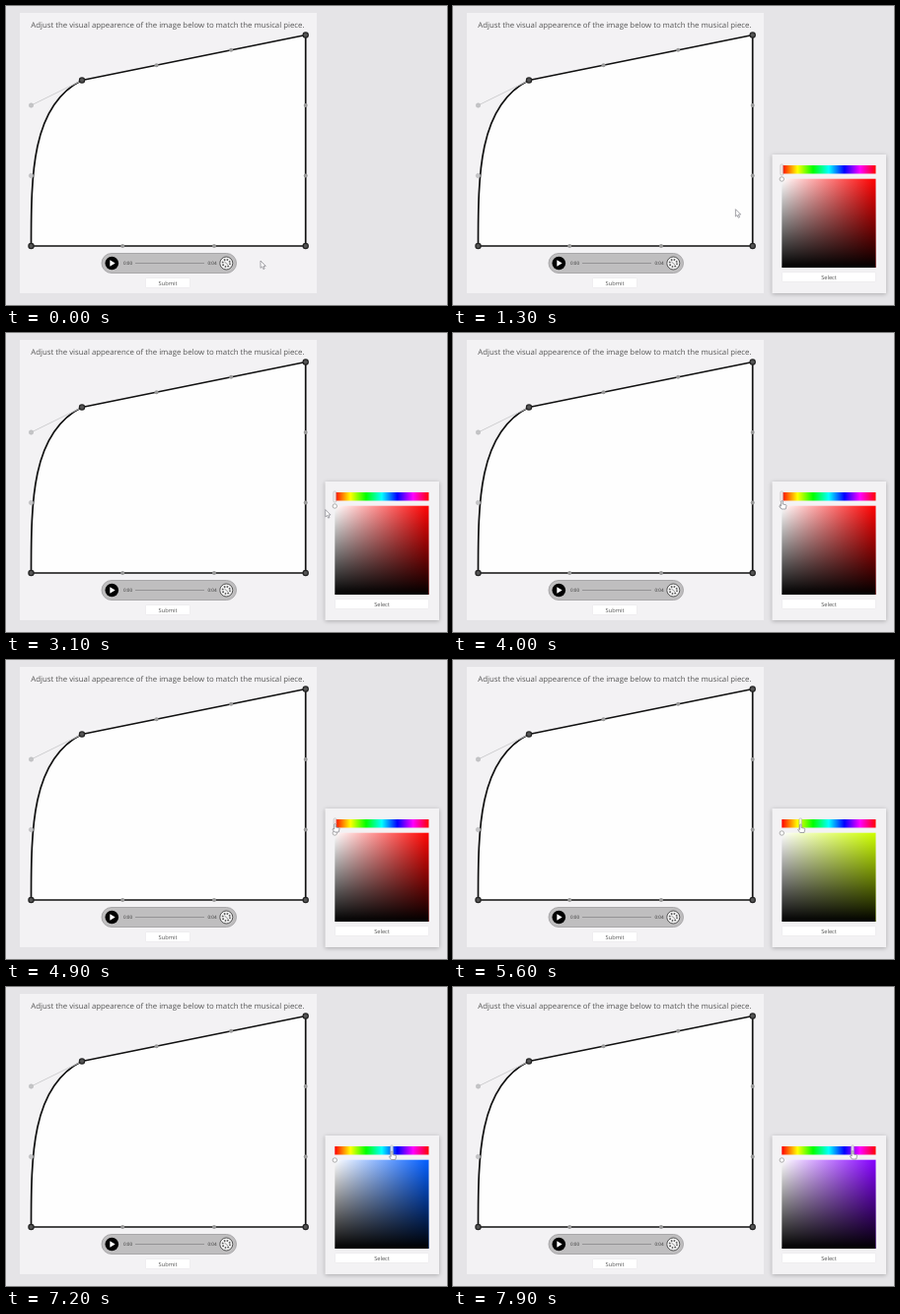
An HTML page for the animation above (8000 ms loop, 447 by 304 pixels).

```html
<!DOCTYPE html>
<html lang="en">
<head>
<meta charset="utf-8">
<title>Colour adjustment</title>
<style>
  html, body { margin: 0; width: 100%; height: 100%; overflow: hidden; background: #e5e4e7; }
  svg { display: block; width: 447px; height: 304px; }
  text { font-family: "Open Sans", "Noto Sans", sans-serif; fill: #555; text-rendering: geometricPrecision; }
  .mid { text-anchor: middle; font-size: 5.7px; }
  .time { font-size: 4.6px; fill: #333; }
  .button { fill: #fff; stroke: #e7e6e9; stroke-width: .6; }
  .edge { fill: #fefefe; stroke: #111; stroke-width: 1.7; stroke-linejoin: round; }
  .corner { fill: #555; stroke: #222; stroke-width: 1.2; }
  .handle { fill: #999; }
  .pale { fill: #c4c4c6; stroke: #b4b4b6; stroke-width: .5; }
  .pointer { fill: #fff; stroke: #8c8c92; stroke-width: .8; stroke-linejoin: round; }
  #picker { filter: drop-shadow(0 1px 2px rgba(0, 0, 0, .25)); }
</style>
</head>
<body>
<svg viewBox="0 0 447 304">
  <defs>
    <linearGradient id="rainbow"></linearGradient>
    <linearGradient id="tint">
      <stop stop-color="#fff"/>
      <stop id="pure" offset="1" stop-color="#f00"/>
    </linearGradient>
    <linearGradient id="shade" x2="0" y2="1">
      <stop stop-color="#000" stop-opacity="0"/>
      <stop offset="1" stop-color="#000"/>
    </linearGradient>
  </defs>

  <rect width="447" height="304" fill="#e5e4e7"/>
  <rect x="14" y="7" width="301" height="285" fill="#f3f2f4"/>
  <text x="25.3" y="22" font-size="7.8">Adjust the visual appearence of the image below to match the musical piece.</text>

  <path class="edge" d="M25.5 244C25.5 172.5 25.5 101 77 75.5L303.7 29.5V244Z"/>
  <path d="M25.5 101L77 75.5" stroke="#cfcfd1"/>
  <g id="dots"></g>

  <rect x="97" y="251.5" width="136.5" height="20" rx="10" fill="#bfbebf" stroke="#9c9b9d" stroke-width=".8"/>
  <circle cx="107.3" cy="261.5" r="6.8"/>
  <path d="M105.3 258.3L110.7 261.5L105.3 264.7Z" fill="#fff"/>
  <text class="time" x="119" y="263.2">0:00</text>
  <path d="M131 261.5H201" stroke="#949395"/>
  <text class="time" x="204.5" y="263.2">0:04</text>
  <circle cx="223.3" cy="261.5" r="6.5" fill="#f4f4f4" stroke="#444" stroke-width=".9"/>
  <circle cx="223.3" cy="261.5" r="3.7" fill="none" stroke="#555" stroke-width="1.7" stroke-dasharray="1.5 1.4"/>
  <path d="M221.5 260L225 263.2" stroke="#777" stroke-width=".8"/>

  <rect class="button" x="141.5" y="276.5" width="45" height="10" rx="1"/>
  <text class="mid" x="164" y="283.6">Submit</text>

  <g id="picker">
    <rect x="323.5" y="151" width="115.5" height="141" fill="#f3f2f4"/>
    <rect x="333.3" y="162" width="95.2" height="8.5" fill="url(#rainbow)"/>
    <rect x="333.3" y="175.7" width="95.2" height="90.3" fill="url(#tint)"/>
    <rect x="333.3" y="175.7" width="95.2" height="90.3" fill="url(#shade)"/>
    <circle cx="333.3" cy="176" r="2.2" fill="#fff" stroke="#999" stroke-width=".8"/>
    <rect id="slider" x="-1.3" y="161" width="2.6" height="11" rx="1" fill="#fff" fill-opacity=".8" stroke="#aaa" stroke-width=".6"/>
    <rect class="button" x="333.5" y="270.5" width="95" height="10" rx="1"/>
    <text class="mid" x="381" y="277.6">Select</text>
  </g>

  <g id="cursor">
    <path id="arrow" class="pointer" d="M0 0V7.4L1.7 5.9L2.9 8.6L4.2 8L3 5.4H5.3Z"/>
    <path id="hand" class="pointer" d="M-.8 0Q0-1 .8 0V3L4 3.7Q4.6 4 4.4 5L3.7 8H-.5L-2.6 5Q-2.3 4-.8 5Z"/>
  </g>
</svg>
<script>
  const $ = id => document.getElementById(id);
  const LOOP = 8000, STEP = 100, OPEN = 1300, HOVER = 3600, DRAG = 4900;
  const BAR = { x: 333.3, width: 95.2 };

  // time, x, y
  const route = [
    [0, 258, 259], [200, 258, 259], [900, 286, 207], [1200, 286, 207],
    [2000, 289, 204], [2200, 289, 204], [2900, 321, 182], [3800, 333.5, 171],
    [4000, 333.5, 171], [4700, 333.5, 167], [4900, 333.5, 167],
    [6300, 371, 168], [7200, 391, 167.5], [7900, 405, 167]
  ];

  function position(t) {
    const i = route.findIndex(p => p[0] > t);
    if (i < 0) return route[route.length - 1].slice(1);
    const a = route[i - 1], b = route[i];
    const k = (t - a[0]) / (b[0] - a[0]);
    return [1, 2].map(n => a[n] + (b[n] - a[n]) * k);
  }

  const dot = (kind, r) => ([x, y]) =>
    `<circle class="${kind}" cx="${x}" cy="${y}" r="${r}"/>`;

  $('dots').innerHTML = [
    ...[[25.5, 101], [25.5, 172.5]].map(dot('pale', 2.2)),
    ...[[152.6, 60.2], [228.1, 44.8], [303.7, 101], [303.7, 172.5], [211, 244], [118.2, 244]].map(dot('handle', 2)),
    ...[[77, 75.5], [303.7, 29.5], [303.7, 244], [25.5, 244]].map(dot('corner', 2.6))
  ].join('');

  $('rainbow').innerHTML = Array.from({ length: 7 }, (_, i) =>
    `<stop offset="${i / 6}" stop-color="hsl(${i * 60}, 100%, 50%)"/>`).join('');

  const show = (id, on) => $(id).style.display = on ? '' : 'none';

  function draw(now) {
    const t = Math.floor(now % LOOP / STEP) * STEP;
    const [x, y] = position(t);
    const pick = t < DRAG ? BAR.x : Math.max(BAR.x, x);
    const hue = (pick - BAR.x) / BAR.width * 360;

    $('cursor').setAttribute('transform', `translate(${x} ${y})`);
    $('slider').setAttribute('transform', `translate(${pick} 0)`);
    $('pure').setAttribute('stop-color', `hsl(${hue}, 100%, 50%)`);
    show('picker', t >= OPEN);
    show('arrow', t < HOVER);
    show('hand', t >= HOVER);
  }

  const start = performance.now();
  function tick() {
    draw(performance.now() - start);
    requestAnimationFrame(tick);
  }
  tick();
</script>
</body>
</html>
```
